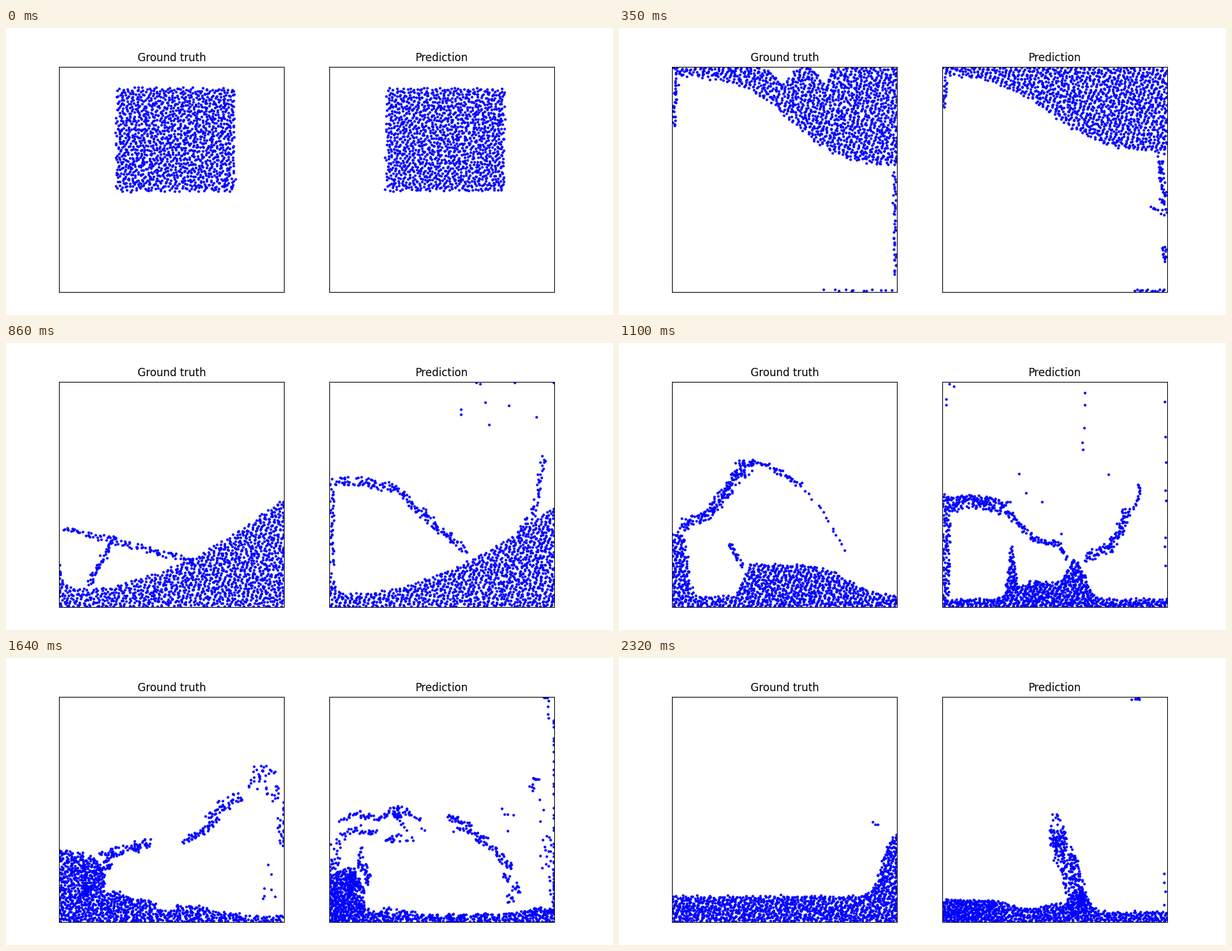
These frames come from a looping animation (950x450 px, 2.35 s). A matplotlib script:

```python
import numpy as np
import matplotlib.pyplot as plt
from matplotlib.animation import FuncAnimation

W, H, DPI = 950, 450, 100
LOOP, STEP = 2350, 10
COUNT = 1480
LEFT, SIDE, TOP, BOTTOM = 83.2, 352.2, 60.55, 413.7
GAP = 1.2 * SIDE
EDGE = 0.003

rng = np.random.default_rng(4)
ticks = np.r_[0:301:30, 350:1911:30, 1960:2321:30]


# Profiles across the box; all places are in units of the box, y upwards
def bump(x, centre, width):
    return np.exp(-((x - centre) / width) ** 2)


def rise(x, centre, width):
    return 1 / (1 + np.exp(np.clip((centre - x) / width, -50, 50)))


def fall(x, centre, width):
    return 1 - rise(x, centre, width)


def level(y):
    return lambda x: y + 0 * x


class Body:
    """Evenly filled region between two profiles, less an oval hole."""

    def __init__(self, top, bottom=level(0), x0=0, x1=1, weight=1, hole=None):
        self.top, self.bottom, self.x0, self.x1 = top, bottom, x0, x1
        self.hole = hole
        x = np.linspace(x0, x1, 200)
        self.low, self.high = bottom(x).min(), top(x).max()
        self.area = np.clip(top(x) - bottom(x), 0, None).mean() * (x1 - x0)
        self.weight = weight * self.area

    def inside(self, x, y):
        ok = (y > self.bottom(x)) & (y < self.top(x))
        if self.hole:
            cx, cy, rx, ry = self.hole
            ok &= ((x - cx) / rx) ** 2 + ((y - cy) / ry) ** 2 > 1
        return ok

    def sample(self, n):
        box = np.array([self.x1 - self.x0, self.high - self.low])
        k = np.arange(1, int(2 * n * box.prod() / self.area) + 100)[:, None]
        p = [self.x0, self.low] + box * (k * [0.7548777, 0.5698403] % 1)
        p = p[self.inside(*p.T)][:n]
        return p + rng.normal(0, 0.0033, p.shape)


class Stream:
    """n particles scattered along a path of the given width."""

    def __init__(self, n, width, *path):
        self.n, self.width, self.path = n, width, np.array(path)

    def sample(self):
        at = np.r_[0, np.cumsum(np.hypot(*np.diff(self.path, axis=0).T))]
        s = (np.arange(self.n) + rng.uniform(0, 1, self.n)) / self.n * at[-1]
        p = np.column_stack([np.interp(s, at, c) for c in self.path.T])
        return p + rng.uniform(-0.5, 0.5, p.shape) * self.width


class Spray:
    """n loose drops around a point."""

    def __init__(self, n, centre, spread):
        self.n, self.centre, self.spread = n, centre, spread

    def sample(self):
        return rng.normal(self.centre, self.spread, (self.n, 2))


def kd_order(p, axis=0):
    """Order points by repeated halving, so equal ranks lie in like places."""
    if len(p) < 2:
        return p
    p = p[np.argsort(p[:, axis], kind="stable")]
    half = len(p) // 2
    return np.vstack([kd_order(p[:half], 1 - axis), kd_order(p[half:], 1 - axis)])


def fill(shapes):
    bodies = [s for s in shapes if isinstance(s, Body)]
    parts = [s.sample() for s in shapes if not isinstance(s, Body)]
    left = COUNT - sum(map(len, parts))
    weight = np.array([b.weight for b in bodies])
    share = (weight / weight.sum() * left).astype(int)
    share[0] += left - share.sum()
    parts += [b.sample(n) for b, n in zip(bodies, share)]
    return kd_order(np.clip(np.vstack(parts), EDGE, 1 - EDGE))


class Fluid:
    def __init__(self):
        self.times, self.poses = [], []

    def pose(self, time, *shapes):
        self.times.append(time)
        self.poses.append(fill(shapes))

    def finish(self):
        self.times = np.array(self.times, float)
        self.poses = np.array(self.poses)
        self.speed = 0.7 * np.gradient(self.poses, self.times, axis=0)

    def at(self, time):
        k = np.searchsorted(self.times, time, "right") - 1
        k = min(k, len(self.times) - 2)
        h = self.times[k + 1] - self.times[k]
        u = (time - self.times[k]) / h
        p, q = self.poses[k:k + 2]
        v, w = self.speed[k:k + 2] * h
        bend = u * (1 - u) * ((1 - u) * v - u * w)
        ease = u * u * (3 - 2 * u)
        return np.clip(p + ease * (q - p) + bend, EDGE, 1 - EDGE)


truth, guess = Fluid(), Fluid()

# Block thrown into the upper right corner
block = Body(level(0.905), level(0.449), 0.253, 0.778)
corner = Body(level(1), lambda x: np.maximum(0.54, 1.11 - 0.9 * x), 0.28, 1)
for fluid in (truth, guess):
    fluid.pose(0, block)
    fluid.pose(
        180, corner,
        Stream(40, 0.017, (0.29, 0.985), (0.06, 0.99)),
        Stream(40, 0.014, (0.985, 0.53), (0.985, 0.12)),
    )

# Spread along the ceiling
truth.pose(
    350,
    Body(lambda x: 1 - 0.07 * (bump(x, 0.49, 0.05) + bump(x, 0.67, 0.03)),
         lambda x: 0.555 + 0.405 * fall(x, 0.53, 0.11)),
    Stream(30, 0.018, (0.022, 0.95), (0.005, 0.73)),
    Stream(42, 0.016, (0.985, 0.54), (0.993, 0.07)),
    Stream(12, 0.01, (0.67, 0.007), (0.99, 0.007)),
)
guess.pose(
    350,
    Body(level(1), lambda x: 0.61 + 0.365 * fall(x, 0.48, 0.13)),
    Stream(18, 0.016, (0.015, 0.95), (0.005, 0.82)),
    Stream(50, 0.03, (0.97, 0.6), (0.985, 0.35)),
    Stream(13, 0.016, (0.985, 0.21), (0.99, 0.14)),
    Stream(5, 0.01, (0.92, 0.375), (0.965, 0.36)),
    Stream(14, 0.01, (0.85, 0.007), (0.99, 0.007)),
)

# Falling down the right wall
truth.pose(
    620,
    Body(lambda x: 0.56 + 0.085 * bump(x, 0.69, 0.05)
         + 0.35 * (np.clip(x - 0.8, 0, 1) / 0.2) ** 1.5,
         lambda x: np.clip(0.53 - 0.53 * (np.clip(x - 0.55, 0, 1) / 0.35) ** 2.5, 0, 1),
         0.55, 1),
    Stream(125, 0.036, (0.21, 0.665), (0.3, 0.63), (0.43, 0.59), (0.57, 0.56)),
    Stream(20, 0.02, (0.205, 0.83), (0.2, 0.7)),
    Stream(20, 0.05, (0.2, 0.71), (0.19, 0.67)),
    Stream(6, 0.005, (0.04, 0.7), (0.12, 0.68)),
    Stream(48, 0.024, (0.01, 0.94), (0.022, 0.68)),
    Stream(38, 0.016, (0.012, 0.67), (0.007, 0)),
    Stream(20, 0.02, (0, 0.01), (0.55, 0.01)),
    Stream(85, 0.035, (0.55, 0.015), (0.9, 0.022)),
)
guess.pose(
    620,
    Body(lambda x: 0.68 + 0.19 * rise(x, 0.9, 0.025) - 0.23 * bump(x, 0.745, 0.05),
         lambda x: np.clip(0.58 - 1.22 * (x - 0.52), 0, 1), 0.52, 1),
    Stream(135, 0.045, (0.03, 0.79), (0.2, 0.83), (0.3, 0.8), (0.38, 0.76),
           (0.46, 0.68), (0.53, 0.68)),
    *(Stream(16, 0.018, (x, y), (x + 0.01, 0.79))
      for x, y in ((0.13, 1), (0.235, 1), (0.345, 0.88), (0.385, 0.87))),
    Stream(50, 0.055, (0.565, 0.86), (0.56, 0.65)),
    Stream(62, 0.028, (0.012, 1), (0.018, 0.72)),
    Stream(38, 0.014, (0.012, 0.63), (0.01, 0.04)),
    Stream(64, 0.025, (0.32, 0.01), (0.95, 0.022)),
    Spray(10, (0.91, 0.98), (0.03, 0.03)),
    Spray(7, (0.45, 0.98), (0.1, 0.02)),
)

# Surge to the left along the floor
truth.pose(
    860,
    Body(lambda x: 0.07 + 0.42 * x ** 2 + 0.12 * np.exp(-x / 0.03)),
    Stream(90, 0.028, (0.02, 0.35), (0.3, 0.28), (0.6, 0.2)),
    Stream(50, 0.028, (0.13, 0.1), (0.25, 0.32)),
)
guess.pose(
    860,
    Body(lambda x: 0.05 + 0.4 * x ** 2 + 0.12 * np.exp(-x / 0.03)),
    Stream(170, 0.04, (0.02, 0.56), (0.15, 0.56), (0.3, 0.52), (0.6, 0.25)),
    Stream(40, 0.02, (0.012, 0.56), (0.012, 0.18)),
    Stream(50, 0.03, (0.83, 0.3), (0.92, 0.45), (0.95, 0.66)),
    Spray(10, (0.7, 0.9), (0.2, 0.08)),
)

# Wave turned over by the left wall
truth.pose(
    1100,
    Body(lambda x: 0.05 + 0.28 * fall(x, 0.07, 0.008)
         + 0.14 * rise(x, 0.31, 0.01) * fall(x, 0.78, 0.06)),
    Stream(185, 0.047, (0.04, 0.36), (0.15, 0.41), (0.22, 0.49), (0.28, 0.58),
           (0.34, 0.63)),
    Stream(60, 0.022, (0.28, 0.64), (0.38, 0.64), (0.45, 0.615), (0.57, 0.54)),
    Stream(15, 0.01, (0.57, 0.54), (0.68, 0.41), (0.77, 0.24)),
    Stream(24, 0.02, (0.25, 0.29), (0.31, 0.18)),
)
guess.pose(
    1100,
    Body(lambda x: 0.035 + 0.2 * bump(x, 0.305, 0.02) + 0.08 * bump(x, 0.42, 0.12)
         + 0.17 * bump(x, 0.59, 0.06)),
    Stream(120, 0.032, (0.02, 0.5), (0.015, 0.03)),
    Stream(165, 0.06, (0.03, 0.45), (0.1, 0.47), (0.2, 0.46), (0.28, 0.44)),
    Stream(85, 0.024, (0.28, 0.43), (0.35, 0.36), (0.41, 0.3), (0.52, 0.28), (0.55, 0.22)),
    Stream(110, 0.04, (0.64, 0.22), (0.74, 0.26), (0.79, 0.34), (0.82, 0.43)),
    Stream(16, 0.01, (0.85, 0.43), (0.875, 0.5), (0.87, 0.55)),
    Stream(5, 0.012, (0.63, 0.97), (0.625, 0.65)),
    Stream(8, 0.01, (0.99, 0.93), (0.99, 0.08)),
    Spray(4, (0.02, 0.97), (0.02, 0.03)),
    Spray(7, (0.6, 0.4), (0.2, 0.2)),
)

# Jet thrown back to the right
truth.pose(
    1400,
    Body(lambda x: np.maximum(0.022, 0.185 - 0.22 * x) + 0.235 * fall(x, 0.15, 0.008)),
    Stream(150, 0.021, (0.15, 0.41), (0.3, 0.45), (0.42, 0.51), (0.52, 0.585),
           (0.575, 0.675), (0.63, 0.79)),
    Stream(60, 0.024, (0.63, 0.8), (0.8, 0.81), (0.93, 0.785)),
    Stream(22, 0.03, (0.16, 0.33), (0.2, 0.4)),
    Stream(24, 0.008, (0.993, 0.75), (0.993, 0.5)),
    Spray(7, (0.94, 0.28), (0.02, 0.1)),
)


def pile(x):
    return (0.035 + 0.15 * fall(x, 0.1, 0.01) + 0.09 * fall(x, 0.2, 0.04)
            + 0.06 * rise(x, 0.9, 0.03))


guess.pose(
    1400,
    Body(pile),
    Body(pile, x1=0.2, weight=0.5),
    Stream(62, 0.018, (0.01, 0.61), (0.21, 0.65), (0.3, 0.69), (0.365, 0.72)),
    Stream(118, 0.02, (0.365, 0.72), (0.45, 0.7), (0.55, 0.64), (0.65, 0.56),
           (0.735, 0.46), (0.772, 0.35)),
    Stream(28, 0.012, (0.762, 0.32), (0.8, 0.11)),
    Stream(60, 0.018, (0.01, 0.44), (0.025, 0.515), (0.24, 0.555), (0.3, 0.585)),
    Stream(24, 0.03, (0.33, 0.63), (0.32, 0.69)),
    Stream(14, 0.01, (0.105, 0.39), (0.105, 0.27)),
    Stream(30, 0.016, (0.12, 0.33), (0.14, 0.17)),
    Stream(14, 0.016, (0.016, 0.36), (0.005, 0.28)),
    Stream(75, 0.013, (0.99, 0.93), (0.99, 0.1)),
    Stream(14, 0.016, (0.94, 0.99), (0.99, 0.975)),
    Spray(5, (0.75, 0.72), (0.1, 0.08)),
)

# Swell coming to rest
truth.pose(
    1910,
    Body(lambda x: 0.04 + 0.15 * fall(x, 0.475, 0.035) + 0.025 * bump(x, 0.28, 0.1)
         + 0.075 * bump(x, 0.83, 0.12) + 0.09 * bump(x, 0.905, 0.015)),
    Stream(55, 0.018, (0.993, 0.45), (0.985, 0.27), (0.993, 0.03)),
)
guess.pose(
    1910,
    Body(lambda x: 0.05 + 0.17 * fall(x, 0.37, 0.012) + 0.055 * bump(x, 0.2, 0.07)
         + 0.065 * bump(x, 0.75, 0.14) + 0.03 * rise(x, 0.9, 0.03),
         hole=(0.28, 0.095, 0.08, 0.06)),
    Stream(14, 0.01, (0.993, 0.66), (0.993, 0.1)),
    Stream(6, 0.008, (0.965, 0.91), (0.975, 0.81)),
    Spray(8, (0.885, 0.99), (0.015, 0.004)),
)
truth.pose(
    2320,
    Body(lambda x: 0.115 + 0.3 * rise(x, 0.935, 0.022)),
    Spray(3, (0.91, 0.44), (0.02, 0.01)),
)
guess.pose(
    2320,
    Body(lambda x: 0.045 + 0.055 * fall(x, 0.32, 0.05) + 0.035 * bump(x, 0.5, 0.08)
         + 0.1 * bump(x, 0.61, 0.05)),
    Body(level(0.095), x1=0.26, weight=0.4),
    Stream(90, 0.075, (0.515, 0.4), (0.515, 0.34)),
    Stream(230, 0.085, (0.52, 0.32), (0.58, 0.2), (0.61, 0.05)),
    Stream(8, 0.03, (0.5, 0.49), (0.51, 0.44)),
    Stream(4, 0.006, (0.988, 0.25), (0.988, 0.06)),
    Spray(8, (0.867, 0.988), (0.011, 0.004)),
)

fig = plt.figure(figsize=(W / DPI, H / DPI), dpi=DPI, facecolor="white")


def panel(x0, title):
    ax = fig.add_axes([x0 / W, 1 - BOTTOM / H, SIDE / W, (BOTTOM - TOP) / H])
    ax.set(xlim=(0, 1), ylim=(0, 1), xticks=[], yticks=[])
    ax.set_title(title, fontsize=12, family="DejaVu Sans")
    return ax.plot([], [], "o", ms=2, color="blue")[0]


views = [(truth, panel(LEFT, "Ground truth")), (guess, panel(LEFT + GAP, "Prediction"))]
for fluid, _ in views:
    fluid.finish()


def draw(i):
    time = ticks[np.searchsorted(ticks, i * STEP, "right") - 1]
    for fluid, line in views:
        line.set_data(*fluid.at(time).T)
    return [line for _, line in views]


anim = FuncAnimation(fig, draw, frames=LOOP // STEP, interval=STEP, repeat=True)
plt.show()
```
